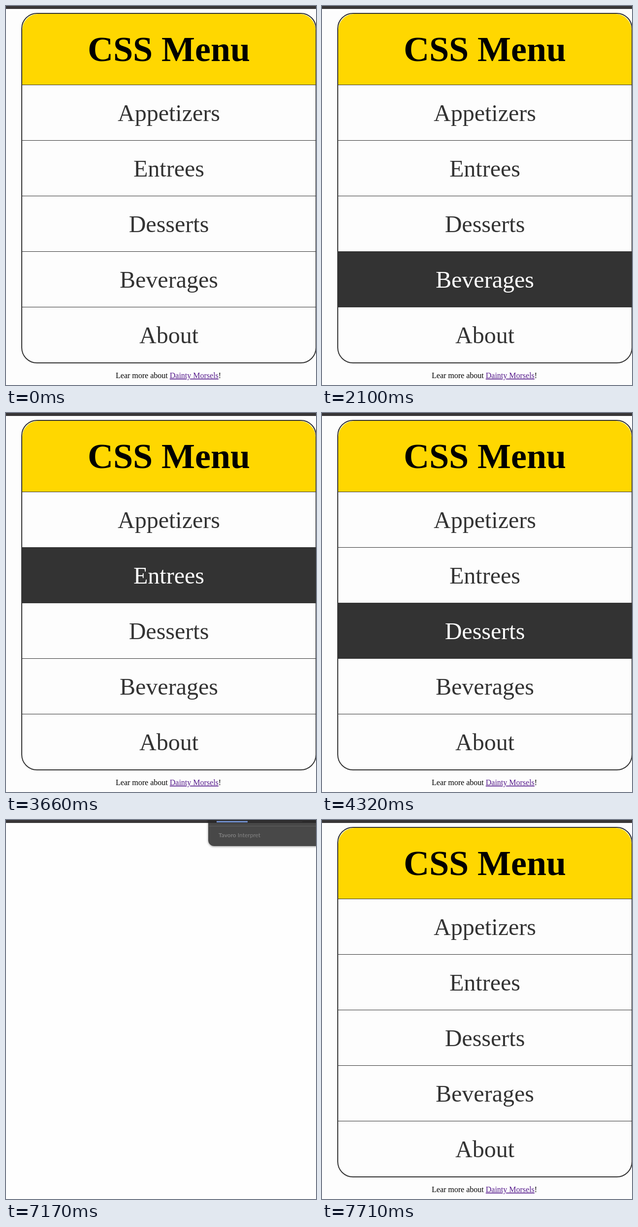
These frames come from a looping animation (630 by 771 pixels, 8000 ms). An HTML page:

```html
<!DOCTYPE html>
<html lang="en">
<head>
<meta charset="utf-8">
<title>CSS Menu</title>
<style>
  html, body { margin: 0; width: 100%; height: 100%; overflow: hidden; background: #fefefe; }
  #stage { position: absolute; left: 0; top: 0; width: 630px; height: 771px; overflow: hidden; }
  #stage > * { position: absolute; }
  svg { left: 0; top: 0; }
  #page { font-family: "Liberation Serif", "Times New Roman", serif; }
  #bar { left: 0; top: 0; width: 630px; height: 6px; background: #383637; }
  .row rect { fill: transparent; }
  .row text { font-size: 48px; fill: #333; text-anchor: middle; }
  .row.on rect { fill: #333; }
  .row.on text { fill: #fff; }
  #popup {
    left: 411px; top: -20px; width: 260px; height: 73px;
    background: #292929; border-radius: 12px;
    box-shadow: 0 1px 4px rgba(0, 0, 0, .5);
  }
  #popup > * { position: absolute; }
  #popup .track { left: 17px; top: 23px; width: 174px; height: 1px; background: #3a3a3a; }
  #popup .tab { left: 17px; top: 22px; width: 63px; height: 3px; background: #7c9fe6; }
  #popup .rule { left: 1px; right: 0; top: 32px; height: 1px; background: #444; }
  #popup .label {
    left: 21px; top: 43px; font: 12px/16px Lato, sans-serif;
    color: #6f6f6f; white-space: nowrap;
  }
  #popup b { font-weight: 600; }
</style>
</head>
<body>
<div id="stage">
  <svg id="page" width="630" height="771" viewBox="0 0 630 771">
    <rect width="630" height="771" fill="#fdfdfd"/>
    <path d="M33 160V49a33 33 0 0 1 33-33H596a33 33 0 0 1 33 33V160Z" fill="#ffd700"/>
    <text x="331" y="112" font-size="72" font-weight="700" text-anchor="middle">CSS Menu</text>
    <g id="rows"></g>
    <rect x="32" y="15" width="598" height="711" rx="31" fill="none" stroke="#333" stroke-width="2"/>
    <text x="223" y="757" font-size="16">Lear more about <tspan fill="#551a8b" text-decoration="underline">Dainty Morsels</tspan>!</text>
  </svg>
  <div id="bar"></div>
  <div id="popup">
    <div class="track"></div>
    <div class="tab"></div>
    <div class="rule"></div>
    <div class="label"><b>Tavoro</b> Interpret</div>
  </div>
</div>
<script>
const LOOP = 8000, STEP = 30;
const LEAVE = 4860, BACK = 7260;
const labels = ["Appetizers", "Entrees", "Desserts", "Beverages", "About"];

// [time, hovered row], 0 means none
const hovers = [
  [0, 0], [390, 1], [420, 2], [840, 3], [990, 4], [1470, 5],
  [2100, 4], [2490, 3], [2790, 2], [3030, 1], [3210, 0],
  [3600, 1], [3660, 2], [3690, 3], [3750, 4], [3810, 5],
  [4200, 4], [4320, 3], [7500, 2], [7650, 1], [7710, 0]
];

const page = document.getElementById("page");
const popup = document.getElementById("popup");
const group = document.getElementById("rows");

function add(parent, tag, attrs) {
  const el = document.createElementNS("http://www.w3.org/2000/svg", tag);
  for (const key in attrs) el.setAttribute(key, attrs[key]);
  return parent.appendChild(el);
}

const rows = labels.map((label, i) => {
  const y = 160 + 113 * i;
  const row = add(group, "g", { class: "row" });
  // the last row keeps the rounded bottom corners
  if (i < 4) add(row, "rect", { x: 33, y, width: 596, height: 114 });
  else add(row, "rect", { x: 33, y, width: 596, height: 565, rx: 30, style: "clip-path: inset(0)" });
  add(group, "rect", { x: 33, y, width: 596, height: 1, fill: "#333" });
  add(row, "text", { x: 331, y: y + 74 }).textContent = label;
  return row;
});

// round only the lower corners of the last row
const last = rows[4].firstChild;
last.setAttribute("y", 552);
last.setAttribute("height", 173);
last.style.clipPath = "inset(60px 0 0 0)";

const clamp = v => Math.max(0, Math.min(1, v));

function popupOpacity(t) {
  if (t < 7170) return clamp((t - LEAVE) / 270);
  return clamp(0.85 - (t - 7170) / 270);
}

function draw(t) {
  const hover = hovers.filter(h => h[0] <= t).pop()[1];
  rows.forEach((row, i) => row.classList.toggle("on", i + 1 === hover));
  page.style.visibility = t >= LEAVE && t < BACK ? "hidden" : "visible";
  popup.style.opacity = popupOpacity(Math.floor(t / STEP) * STEP);
}

const start = performance.now();
function tick() {
  draw((performance.now() - start) % LOOP);
  requestAnimationFrame(tick);
}
draw(0);
tick();
</script>
</body>
</html>
```
